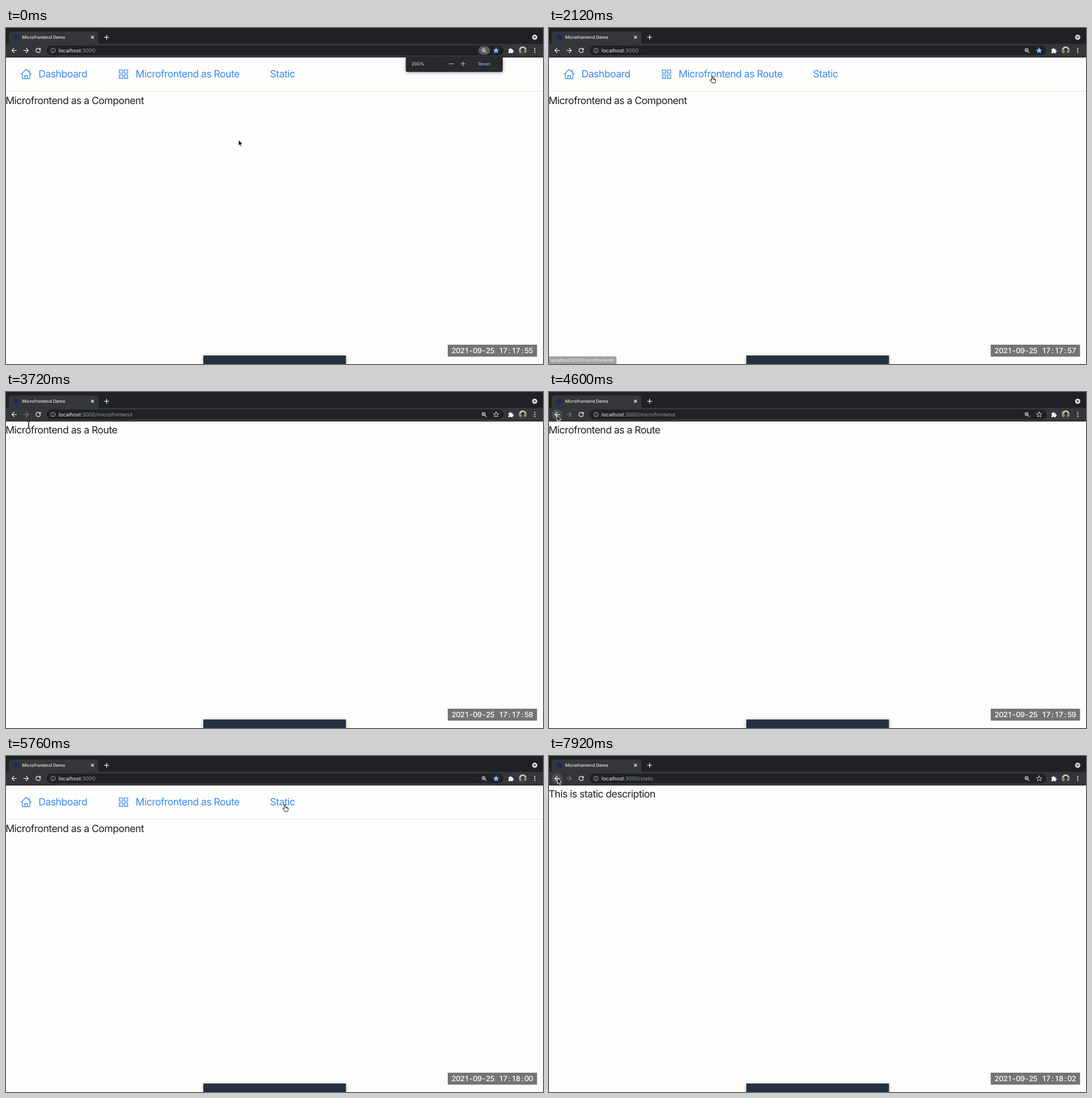
Recreate the animation shown at these times as an HTML page. Size 947 px wide and 592 px high, loop 8000 ms.

```html
<!DOCTYPE html>
<html lang="en">
<head>
<meta charset="utf-8">
<title>Microfrontend Demo</title>
<style>
  html, body { margin: 0; width: 100%; height: 100%; overflow: hidden; background: #fdfdfc; }
  svg { display: block; width: 100vw; height: 100vh; text-rendering: geometricPrecision; }
  text { font-family: Inter, Roboto, "Liberation Sans", sans-serif; }
  .page text { font-size: 17.6px; letter-spacing: -.03em; fill: #1d1f22; }
  .page .nav text { fill: #3a8af3; }
  .line { fill: none; stroke-width: 1.3; stroke-linecap: round; stroke-linejoin: round; }
  .small { font-size: 7.8px; fill: #e8eaed; }
  .shadow { filter: drop-shadow(0 1px 3px rgba(0, 0, 0, .35)); }
</style>
</head>
<body>
<svg viewBox="0 0 947 592" xmlns="http://www.w3.org/2000/svg">
  <rect width="947" height="592" fill="#fdfdfc"/>

  <g class="page">
    <g id="home">
      <g class="nav">
        <g class="line" stroke="#3a8af3" stroke-width="1.5">
          <path d="M26.6 81.6L35.5 72.7 44.4 81.6M29 79.6V89.4H42V79.6M33.2 89.4V84H37.8V89.4M41 77.8V74"/>
          <path d="M199.9 73.8h5.9v5.9h-5.9zM208.7 73.8h5.9v5.9h-5.9zM199.9 82.6h5.9v5.9h-5.9zM208.7 82.6h5.9v5.9h-5.9z"/>
        </g>
        <text x="57.3" y="87.3">Dashboard</text>
        <text x="228.6" y="87.3">Microfrontend as Route</text>
        <text x="465.6" y="87.3">Static</text>
      </g>
      <rect id="rule" y="111" width="947" height="1"/>
    </g>
    <text id="heading" x="-.8"></text>
  </g>

  <!-- browser frame -->
  <rect width="947" height="52" fill="#1f2125"/>
  <path d="M0 28H3Q5 28 5 25V11Q5 6 10 6H158Q163 6 163 11V25Q163 28 166 28H947V51.5H0Z" fill="#34363a"/>
  <circle cx="18.2" cy="16.3" r="4.8" fill="#1a2b5c"/>
  <text class="small" x="28.6" y="19.1" font-weight="500" style="font-size:7.7px">Microfrontend Demo</text>
  <g class="line" stroke="#e4e6e9">
    <path d="M150.4 14.2l4.2 4.2m0-4.2l-4.2 4.2M173.7 16.3h7.6m-3.8-3.8v7.6"/>
  </g>
  <circle cx="932.4" cy="16.3" r="4.6" fill="#d5d7da"/>
  <path d="M930 15.2h4.8l-2.4 2.8z" fill="#1f2125"/>

  <circle id="hover" cx="14.3" cy="39.6" r="9.5" fill="#4b4d51"/>
  <g class="line" stroke="#e4e6e9">
    <path id="back" d="M18.5 39.6H10.4m3.8-3.9l-3.9 3.9 3.9 3.9"/>
    <path id="forward" d="M31.3 39.6h8.1m-3.8-3.9l3.9 3.9-3.9 3.9"/>
    <path d="M60 37.2A3.9 3.9 0 1 0 60.5 40.7"/>
  </g>
  <path d="M61.3 35v4h-4z" fill="#e4e6e9"/>
  <rect x="71.5" y="31" width="806" height="17" rx="8.5" fill="#1f2125"/>
  <g class="line" stroke="#a6aaae" style="stroke-width:1">
    <circle cx="83" cy="39.6" r="4"/>
    <path d="M83 39.4v2.2M83 37.5v.1"/>
  </g>
  <text x="92.8" y="42.9" font-size="9.2" fill="#f1f3f4">localhost<tspan id="path" fill="#989ca1"></tspan></text>
  <rect id="chip" x="833" y="32" width="20.5" height="15" rx="7.5" fill="#5a5c60"/>
  <g class="line" stroke="#c9ccd0" style="stroke-width:1.1">
    <circle cx="842.2" cy="38.8" r="2.8"/>
    <path d="M844.4 41l2.8 2.8M841 38.8h2.4M842.2 37.6v2.4"/>
  </g>
  <path id="star" class="line" style="stroke-width:1"/>
  <path d="M886 37.3h2.2a1.5 1.5 0 1 1 2.9 0h2.4v2.3a1.5 1.5 0 1 1 0 2.9v2h-2.6a1.4 1.4 0 0 0-2.7 0H886v-2.4a1.4 1.4 0 0 0 0-2.7z" fill="#f0f1f3"/>
  <clipPath id="round"><circle cx="911.2" cy="39.6" r="7"/></clipPath>
  <g clip-path="url(#round)">
    <rect x="904" y="32" width="15" height="15" fill="#8b9277"/>
    <rect x="904" y="32" width="15" height="5" fill="#c8cbbd"/>
    <ellipse cx="911.5" cy="38.5" rx="3" ry="3.4" fill="#33352f"/>
    <ellipse cx="911.5" cy="47" rx="4.6" ry="5.2" fill="#3d3f39"/>
  </g>
  <g fill="#e4e6e9">
    <circle cx="932.5" cy="36.2" r="1.1"/><circle cx="932.5" cy="39.7" r="1.1"/><circle cx="932.5" cy="43.2" r="1.1"/>
  </g>

  <g id="zoom" class="shadow">
    <path d="M705 51.5H876V74Q876 77.5 872.5 77.5H708.5Q705 77.5 705 74Z" fill="#282a2d"/>
    <text class="small" x="715.3" y="65.8">200%</text>
    <path class="line" d="M781.2 63h7.6M802.2 63h7.6m-3.8-3.8v7.6" stroke="#c9ccd0" style="stroke-width:1"/>
    <rect x="822" y="54.8" width="43" height="16.4" rx="2.5" fill="none" stroke="#323539" stroke-width=".8"/>
    <text class="small" x="843.5" y="65.8" text-anchor="middle" font-weight="500" style="fill:#8ab4f8">Reset</text>
  </g>

  <rect class="shadow" x="348" y="577" width="251.5" height="18" fill="#24323f"/>

  <g id="status">
    <path id="bubble" fill="#35363a"/>
    <text class="small" id="link" x="2.8" y="588.2"></text>
  </g>

  <rect x="779" y="558" width="157.5" height="21" fill="#747474"/>
  <text id="clock" y="573.1" font-size="13" font-weight="500" fill="#fff" text-anchor="middle"></text>

  <g id="cursor">
    <path id="arrow" d="M0 0V10.6L2.4 8.4 4 12.1 5.8 11.3 4.2 7.7H7.5Z" fill="#111" stroke="#fff" stroke-width=".9" stroke-linejoin="round"/>
    <path id="hand" d="M-1.2.4C-1.2-.8.7-.8.7.4V4L4.8 5Q6 5.4 5.8 7L5.3 9.6 4.7 11.8H-.6L-1.4 10.2-3.8 7.2C-4.6 6-3.2 5.4-2.2 6.4L-1.2 7.3ZM2.2 4.6V6.6M4 5V6.8" fill="#fff" stroke="#111" stroke-width="1" stroke-linejoin="round"/>
    <path id="beam" d="M-2.6-5.4Q0-5.4 0-3.8V3.8Q0 5.4-2.6 5.4M2.6-5.4Q0-5.4 0-3.8V3.8Q0 5.4 2.6 5.4M-1.3 1.8H1.3" fill="none" stroke="#222" stroke-width="1"/>
  </g>
</svg>

<script>
const LOOP = 8000, STEP = 40;
const $ = id => document.getElementById(id);
const set = (id, attrs) => {
  for (const key in attrs) $(id).setAttribute(key, attrs[key]);
};
const show = (id, on) => set(id, { opacity: Number(on) });
const ramp = (t, from, to) => Math.min(1, Math.max(0, (t - from) / (to - from)));

const pages = {
  home: { path: ':3000', heading: 'Microfrontend as a Component', y: 133.6 },
  route: { path: ':3000/microfrontend', heading: 'Microfrontend as a Route', y: 73.2 },
  fixed: { path: ':3000/static', heading: 'This is static description', y: 73.2 }
};
const visits = [[0, 'home'], [2480, 'route'], [4760, 'home'], [6040, 'fixed']];

// Pointer moves: start, end, x, y
const moves = [
  [720, 760, 410, 301], [920, 1000, 410, 197], [1560, 2080, 288, 85],
  [2800, 3000, 52, 16], [3280, 3480, 46, 2], [3480, 3720, 40, 58],
  [3720, 4000, 14, 41], [4800, 5080, 11, 45], [5400, 5720, 492, 86],
  [6360, 6560, 105, 96], [7200, 7920, 15, 38.5]
];
const links = [[26, 145], [199, 413], [466, 512]];

function pointer(t) {
  let x = 410, y = 197;
  for (const [start, end, toX, toY] of moves) {
    const k = 1 - (1 - ramp(t, start, end)) ** 3;
    x += (toX - x) * k;
    y += (toY - y) * k;
  }
  return [x, y];
}

function pointerKind(name, x, y) {
  const onLink = links.some(([a, b]) => x >= a && x <= b);
  if (name === 'home' && y > 70 && y < 93 && onLink) return 'hand';
  const base = pages[name].y;
  const width = name === 'home' ? 245 : 198;
  return x < width && y > base - 18 && y < base + 4 ? 'beam' : 'arrow';
}

function statusAlpha(t) {
  if (t < 2480) return .45 * ramp(t, 2040, 2120);
  if (t < 5000) return 1 - ramp(t, 2800, 3000);
  return t < 6360 ? ramp(t, 5880, 6000) : .36 * (1 - ramp(t, 6480, 6560)) + .64 * (1 - ramp(t, 6360, 6480));
}

function clockText(t) {
  const sec = 55 + Math.floor(t / 1000);
  const two = n => String(n).padStart(2, '0');
  return `2021-09-25 17:${17 + Math.floor(sec / 60)}:${two(sec % 60)}`;
}

function starPath(cx, cy, r) {
  const points = Array.from({ length: 10 }, (_, i) => {
    const a = i * Math.PI / 5, d = i % 2 ? r * .45 : r;
    return `${cx + d * Math.sin(a)} ${cy - d * Math.cos(a)}`;
  });
  return 'M' + points.join('L') + 'Z';
}

function draw(t) {
  const name = visits.filter(v => v[0] <= t).pop()[1];
  const page = pages[name], home = name === 'home';
  show('home', home);
  set('rule', { fill: t < 2480 ? '#dfe5d2' : '#e6e7e3' });
  set('heading', { y: page.y });
  $('heading').textContent = page.heading;
  $('path').textContent = page.path;
  set('forward', { stroke: home ? '#e4e6e9' : '#74777b' });
  set('star', { fill: home ? '#8ab4f8' : 'none', stroke: home ? '#8ab4f8' : '#d5d7da' });
  $('star').style.fill = home ? '#8ab4f8' : 'none';

  const zoom = 1 - ramp(t, 1720, 1840);
  show('zoom', zoom);
  show('chip', zoom);

  const early = t < 5000, edge = early ? 119 : 87;
  show('status', statusAlpha(t));
  set('bubble', { d: `M0 578.5H${edge - 3}Q${edge} 578.5 ${edge} 581.5V592H0Z` });
  $('link').textContent = 'localhost' + (early ? pages.route : pages.fixed).path;

  $('clock').textContent = clockText(t);

  const [x, y] = pointer(t), kind = pointerKind(name, x, y);
  set('cursor', { transform: `translate(${x} ${y})` });
  for (const id of ['arrow', 'hand', 'beam']) show(id, id === kind);
  show('hover', Math.hypot(x - 14.3, y - 39.6) < 9.5);
}

set('star', { d: starPath(864.3, 39.9, 4.9) });
set('clock', { x: Array.from({ length: 19 }, (_, i) => 789.8 + i * 7.55).join(' ') });

function tick(now) {
  draw(Math.floor(now % LOOP / STEP) * STEP);
  requestAnimationFrame(tick);
}
draw(0);
requestAnimationFrame(tick);
</script>
</body>
</html>
```
